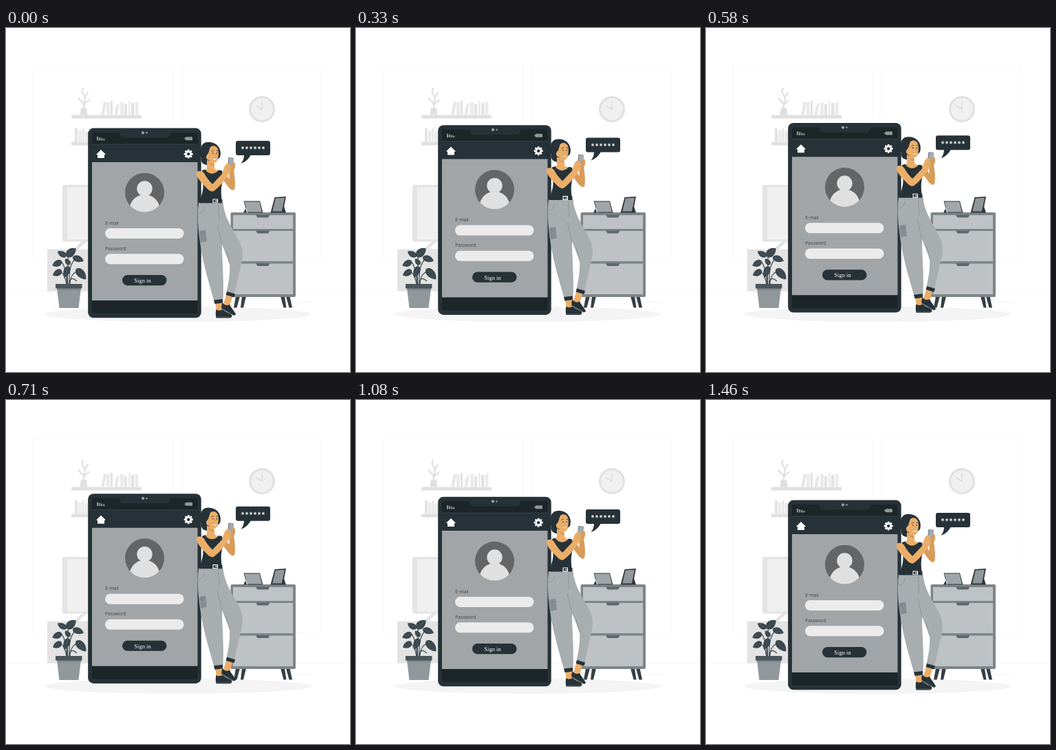
Write an HTML page with a canvas that moves like this. It is 500 px wide and 500 px high and loops after 1500 ms.

```html
<!DOCTYPE html>
<html lang="en">
<head>
<meta charset="utf-8">
<title>Sign in</title>
<style>
html, body { margin: 0; width: 100%; height: 100%; overflow: hidden; background: #fff; }
canvas { display: block; width: 500px; height: 500px; }
</style>
</head>
<body>
<canvas id="stage"></canvas>
<script>
const canvas = document.getElementById('stage');
const ctx = canvas.getContext('2d');
const ratio = window.devicePixelRatio || 1;
canvas.width = canvas.height = 500 * ratio;

const DARK = '#263238', BLACK = '#1c2528', SKIN = '#ebae68', SHADE = '#d99b58';
const LOOP = 1500, FPS = 24, LAST = 35, RISE = 0.55;

function fill(color, d) {
  ctx.fillStyle = color;
  ctx.fill(new Path2D(d));
}
function line(color, width, d) {
  ctx.strokeStyle = color;
  ctx.lineWidth = width;
  ctx.stroke(new Path2D(d));
}
function box(color, x, y, w, h, r = 0) {
  ctx.fillStyle = color;
  ctx.beginPath();
  ctx.roundRect(x, y, w, h, r);
  ctx.fill();
}
function oval(color, x, y, rx, ry = rx) {
  ctx.fillStyle = color;
  ctx.beginPath();
  ctx.ellipse(x, y, rx, ry, 0, 0, Math.PI * 2);
  ctx.fill();
}
function text(str, x, y, font, color) {
  ctx.font = font;
  ctx.fillStyle = color;
  ctx.fillText(str, x, y);
}

function drawRoom() {
  ctx.fillStyle = '#fff';
  ctx.fillRect(0, 0, 500, 500);
  line('#f9f9f9', 1, 'M39.5 55.5H242.5V337.5H39.5ZM255.5 55.5H457.5V337.5H255.5Z');
  line('#f4f4f4', 0.8, 'M0 382.5H500M417 398.5H447');
  oval('#f4f4f4', 249.5, 416, 193.5, 11);

  // shelves
  box('#e0e0e0', 95, 126.5, 102, 5);
  box('#e0e0e0', 95, 165.5, 40, 5);
  fill('#e0e0e0', 'M109 116H117L118.5 126.5H107.5Z');
  line('#e0e0e0', 2.2, 'M113 117C112 109 116 105 114 99C112 95 109 94 112 87M106 101C106 106 111 106 113 111M121 104C119 108 114 107 113 113M119 93C118 98 115 97 115 102');
  fill('#e6e6e6', 'M138.5 126L142 107L146 108L142.5 126ZM158 126L159.5 115L163 109L164.5 110L162 126Z');
  [[146, 108, 5], [152, 106, 3], [166, 108, 5], [172, 111, 4], [178, 106, 2.5], [182, 109, 4.5], [188, 107.5, 4.5]]
    .forEach(([x, y, w], i) => box(i % 2 ? '#e2e2e2' : '#ebebeb', x, y, w, 126.5 - y));
  [[100, 146, 4], [105, 149, 5], [111, 146, 2], [114, 150, 5]]
    .forEach(([x, y, w], i) => box(i % 2 ? '#ebebeb' : '#e2e2e2', x, y, w, 165.5 - y));

  // clock
  oval('#e0e0e0', 372, 118, 19);
  oval('#f0f0f0', 372, 118, 16);
  line('#dcdcdc', 1.6, 'M372 107V118L363.5 113');

  // screen and sideboard
  line('#e4e4e4', 5, 'M122 303L101 322');
  box('#e4e4e4', 82, 228, 60, 82.5, 3);
  box('#f0f0f0', 89, 231.5, 50, 76, 1);
  box('#e3e3e3', 60, 321.5, 70, 61);
}

function leaf(x, y, angle, length, width) {
  ctx.save();
  ctx.translate(x, y);
  ctx.rotate(angle * Math.PI / 180);
  fill('#3b474e', `M0 0C${length * .1} ${-width} ${length * .7} ${-width} ${length} 0C${length * .7} ${width * .8} ${length * .1} ${width} 0 0Z`);
  line('#657077', 0.4, `M1 0H${length - 2}`);
  ctx.restore();
}

function drawPlant() {
  line('#3b474e', 1.2, 'M90 373C88 360 91 345 90 331M92 373C91 350 95 341 101 335M89 373C88 356 85 344 79 338M93 373C93 361 99 353 106 355M88 373C87 363 83 355 78 354M92 372C93 362 98 363 103 368');
  [
    [88, 332, -40, 18, 8], [88, 332, -150, 15, 6], [81, 339, 155, 15, 6.5],
    [97, 333, 20, 17, 6.5], [91, 346, 112, 18, 6.5], [81, 352, 150, 15, 6.5],
    [102, 350, 47, 21, 8], [93, 344, -128, 11, 5]
  ].forEach(args => leaf(...args));
  fill('#91989c', 'M74 378H109L105.5 407H77.5Z');
  fill('#7d868b', 'M74.2 378H109L108.7 381H74.5Z');
  box('#4a555b', 72, 372, 38.5, 6.5);
}

function drawCabinet() {
  fill('#353f44', 'M334 390H340L335.5 406.5H331ZM343 390H349L345 406.5H341ZM399 390H405L407.5 406.5H403.5ZM407 390H412.5L416 406.5H411.5Z');
  box('#7e8588', 326.5, 268, 94.5, 123, 2);
  [[272, 20], [295, 44], [342.5, 44.5]].forEach(([y, h]) => {
    box('#bec2c4', 330, y, 87, h);
    fill('#5d666a', `M363 ${y - .5}H383.5L381 ${y + 3.5}H365.5Z`);
  });

  fill('#30393d', 'M351 257L345 268.5H351ZM345.5 251.5H369L373.5 268.5H350Z');
  fill('#a0a6a9', 'M346.5 252.4H368.4L372 267.4H350.7Z');
  fill('#30393d', 'M403 256L407 268.5H399ZM390.5 246L407 245L402.5 268.5H384.5Z');
  fill('#90979a', 'M391.8 247.5L405 246.7L400.8 266.5H387.2Z');
}

function drawIcons() {
  fill('#fff', 'M130.8 184L138 177L145.2 184H143V189H133V184Z');
  ctx.save();
  ctx.translate(265.2, 183.1);
  for (let i = 0; i < 8; i++) {
    box('#fff', -1.4, -6.5, 2.8, 4, 0.5);
    ctx.rotate(Math.PI / 4);
  }
  oval('#fff', 0, 0, 4.8);
  oval(DARK, 0, 0, 2.2);
  ctx.restore();

  [5.5, 4.5, 3.5, 2.5].forEach((h, i) => box('#90979a', 132 + i * 3.1, 163.5 - h, 2.1, h));
  box('#90979a', 261, 158.2, 10, 5, 0.8);
  box('#90979a', 259.4, 159.5, 1.5, 2.4);
}

function drawPhone() {
  box(DARK, 119.2, 145.6, 164.5, 275.7, 8);
  box(BLACK, 125, 152, 153.5, 263, 3);
  fill(DARK, 'M162 151H242C238 152 238 159.5 234 159.5H170C166 159.5 166 152 162 151Z');
  oval('#9da3a6', 199, 152.3, 2.1);
  oval('#9da3a6', 204.5, 152.3, 1.2);
  box(DARK, 125, 169, 153.5, 26.5);
  line('#465158', 0.6, 'M125 169H278.5');
  box('#a1a5a8', 125, 195, 153.5, 201);
  drawIcons();

  ctx.save();
  ctx.beginPath();
  ctx.arc(201.5, 239.2, 28.5, 0, Math.PI * 2);
  ctx.clip();
  box('#646566', 170, 208, 64, 64);
  oval('#e0e0e0', 201.5, 264, 22, 22);
  oval('#e0e0e0', 201.5, 233.5, 11.2);
  ctx.restore();

  const label = '6.5px Inter, sans-serif';
  text('E-mail', 144.2, 285.6, label, '#41494e');
  text('Password', 144.2, 322.8, label, '#41494e');
  box('#ebebeb', 144, 291, 114.5, 15, 7.5);
  box('#ebebeb', 144, 328.2, 114.5, 15, 7.5);
  box(DARK, 169, 359, 64.5, 15.2, 7.6);
  text('Sign in', 186.3, 370, '8.5px "Liberation Serif", serif', '#fff');
}

function drawLegs() {
  fill(SKIN, 'M304 399L314 398L314 412L306 412ZM320 388L329 391L325 405L316 402Z');
  fill(DARK, 'M305.5 409C309 412 313 410 315 409C319 413 325 414 328 417C329 419 328 421 326 421.5H305.5C304.5 417 304.5 413 305.5 409Z');
  fill(DARK, 'M315 399C317 403 321 404 325 402C327 407 332 411 334 416C333 418 331 418 329 417L313.5 408C313 404 313.5 401 315 399Z');
  line('#6b7478', 0.5, 'M306 420H327M314 407.5L331 417');
  fill('#a8adaf', 'M280 254H315.5C317 271 325 285 333 299C342 314 346 324 343 338L332 387L320.5 384C324 368 326 354 325 343C322 334 318 325 314 315C314 340 317 366 315.5 395L302.5 397C296 374 288 348 284 324C280 300 277 275 280 254Z');
  line('#858b8e', 0.7, 'M280 270C285 269 288 265 289 260M314 315L307 286M325 343L320 324M309 257C308 268 311 273 309 280');
  fill('#878d90', 'M281 295L290 293.5L292 310L283 312Z');
  line('#70777a', 0.6, 'M281.5 299L290.5 297.5');
  fill(DARK, 'M302 395.5L315 394V399.5L303.5 401ZM321 383L333 386.5L331.5 391.5L319.5 388Z');
}

function drawHead() {
  fill(DARK, 'M296 166C288 165 283 170 283 177C281 180 281 185 284 188C283 192 284 196 288 198C292 200 298 200 301 197L311 188C314 178 309 167 296 166Z');
  fill(SKIN, 'M292 192L302 195L303.5 205C305 207 309 206 313 208L297 218L282 209C287 206 292 206 292 203Z');
  fill(SHADE, 'M294 194C297 198 300 198 302.5 197L302.8 200C298 201 295 198 294 194Z');
  fill(SKIN, 'M297 173C301 170 306 171 308 176C309.5 182 309 190 306 194.5C303 198 297 196 295 192C291 192 289.5 186 292.5 184C295 182 295 177 297 173Z');
  line(DARK, 0.8, 'M298.5 179.5C299.5 178.3 301 178.2 302 178.7M305.5 178.2L308 178.5');
  oval(DARK, 300.8, 182.2, 0.7, 0.9);
  oval(DARK, 306.3, 182, 0.7, 0.9);
  line(SHADE, 0.7, 'M304 182L305.4 186H303.6');
  fill('#fff', 'M299.5 189C302 190 304.5 189.7 306.5 188.5C305.5 192 301 192 299.5 189Z');
  line('#9c5732', 0.5, 'M299.5 189C302 190 304.5 189.7 306.5 188.5');
}

function drawWoman() {
  drawLegs();
  line(SHADE, 8, 'M314 211C318 218 324 225 328 231');
  fill(SHADE, 'M332.5 233C333.5 224 332.5 216 331 206L324.5 207L324.5 229C325 236 331 238 332.5 233Z');
  drawHead();
  fill(DARK, 'M285 207L289.5 205.5C294 213.5 304 213.5 309 206.5L313.5 207C317 213 315 222 313.5 229C312 237 313 244 314 254H281.5C284 243 288 234 286 225Z');
  fill(DARK, 'M281.5 249H314.5V254.5H281Z');
  line('#fff', 1.1, 'M301 249H307.5V253.8H301ZM304 251.4H307');
  fill(SKIN, 'M276.5 211C277.5 206.5 285 206.5 288 211C291 217 296 223 300 227L316 210L322 215C316 224 309 232 302 237C299 238.5 296 237 293 234C287 228 277.5 219 276.5 211Z');
  line(SHADE, 0.6, 'M300 227L296 223');
  fill('#7c8589', 'M323.3 188L331 188.8L329.8 202L322 201.5Z');
  fill('#a5abae', 'M324.5 189L331 189.5L330 201L323.5 200.5Z');
  fill(SKIN, 'M314 212C316 206 317 200 321 197C324 196 326 199 326.5 202L328 206C327 210 323 212 321 217Z');
  fill(SHADE, 'M328 197L332 195C334 199 333 204 331 207L326 207Z');
  line(SHADE, 0.5, 'M321 200L325.5 201M320.5 203L326 204M320.5 206L326 207');
}

function drawBubble() {
  box(DARK, 334, 164, 50, 21, 3);
  fill(DARK, 'M346 184C346 190 344 194 341.5 197C348 195 353 190 356 184Z');
  for (let i = 0; i < 6; i++) {
    const x = 344 + i * 6;
    for (let k = 0; k < 3; k++) {
      const a = Math.PI / 2 + k * Math.PI / 3;
      const dx = 2.2 * Math.cos(a), dy = 2.2 * Math.sin(a);
      line('#fff', 0.9, `M${x - dx} ${174.2 - dy}L${x + dx} ${174.2 + dy}`);
    }
  }
}

// Linear rise and fall, stepped at 24 pictures per second.
function lift(ms) {
  const step = Math.min(LAST, Math.floor((ms % LOOP + 5) * FPS / 1000));
  return RISE * Math.min(step, LAST - step);
}

let start;
function render(now) {
  start ??= now;
  ctx.setTransform(ratio, 0, 0, ratio, 0, 0);
  drawRoom();
  drawPlant();
  drawCabinet();
  ctx.translate(0, -lift(now - start));
  drawPhone();
  drawWoman();
  drawBubble();
  requestAnimationFrame(render);
}
requestAnimationFrame(render);
</script>
</body>
</html>
```
